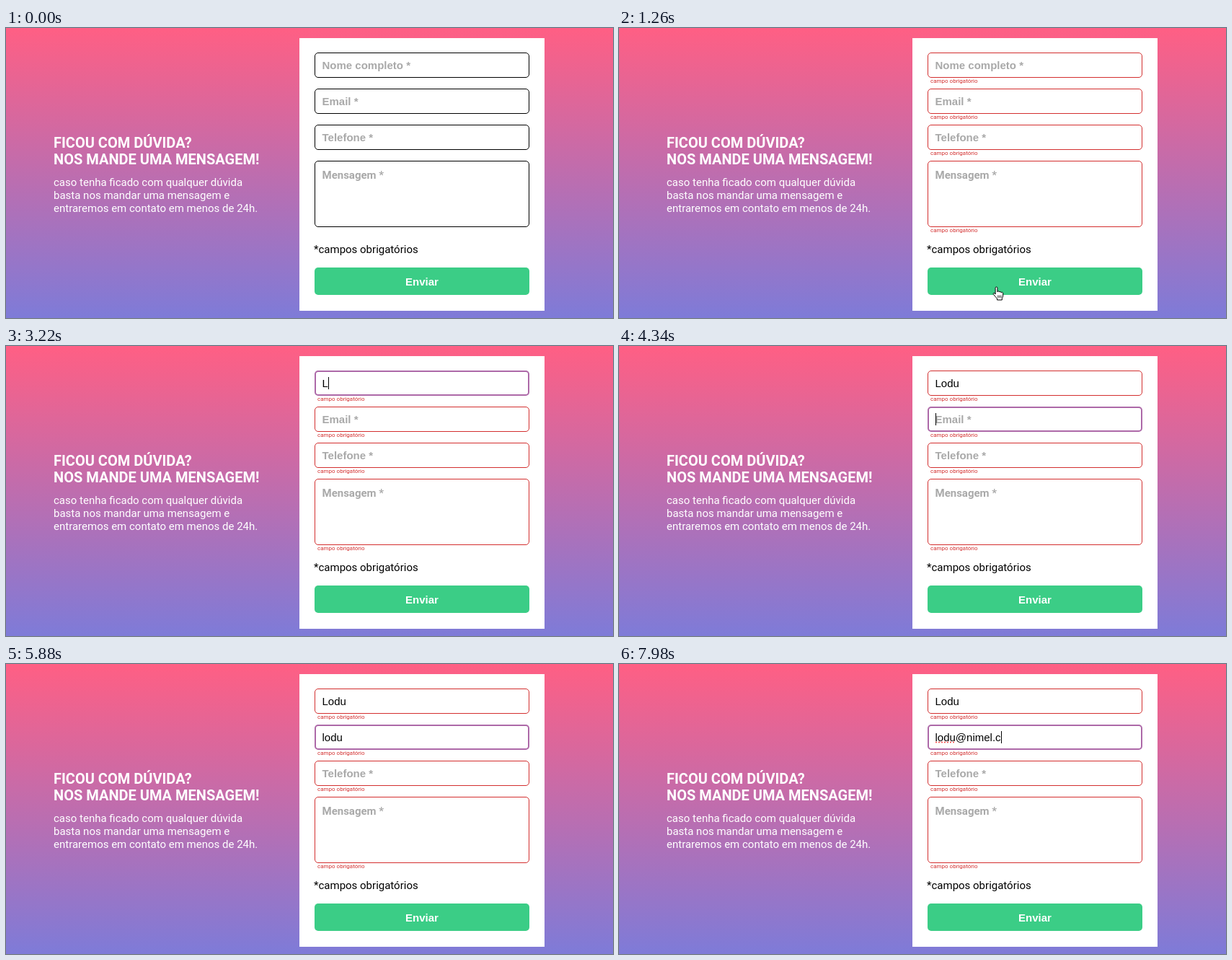
An HTML page that plays this animation: 842 by 402 pixels, repeating every 8000 ms.

```html
<!DOCTYPE html>
<html lang="pt">
<head>
<meta charset="utf-8">
<title>Formulário de contato</title>
<style>
  html, body { margin: 0; height: 100%; overflow: hidden; }
  svg { display: block; width: 100%; height: 100%; }
  text { font: 15px Roboto, sans-serif; white-space: pre; }
  .title { font-size: 20px; font-weight: 700; }
  .light { fill: #fff; }
  .error { font-size: 8px; fill: #d32f2f; }
  .input { font-family: "Liberation Sans", Arial, sans-serif; }
  .hint { font-weight: 700; fill: #a9a9a9; }
  .button { font-weight: 700; fill: #fff; text-anchor: middle; }
</style>
</head>
<body>
<svg id="stage" viewBox="0 0 842 402">
  <defs>
    <linearGradient id="sky" x2="0" y2="1">
      <stop stop-color="#ff5f84"/>
      <stop offset="1" stop-color="#7e7bd8"/>
    </linearGradient>
  </defs>
  <rect width="842" height="402" fill="url(#sky)"/>
  <g class="light">
    <text class="title" x="66" y="166">FICOU COM DÚVIDA?</text>
    <text class="title" x="66" y="189">NOS MANDE UMA MENSAGEM!</text>
    <text x="66" y="219">caso tenha ficado com qualquer dúvida</text>
    <text x="66" y="237">basta nos mandar uma mensagem e</text>
    <text x="66" y="255">entraremos em contato em menos de 24h.</text>
  </g>
  <rect x="407" y="14" width="340" height="378" fill="#fff"/>
  <g id="fields"></g>
  <text x="427" y="312">*campos obrigatórios</text>
  <rect x="428" y="332" width="298" height="38" rx="5" fill="#3bcd86"/>
  <text class="input button" x="577" y="357">Enviar</text>
  <path id="squiggle" d="M440 108.5H467" stroke="#f0403c" stroke-width="2"
        stroke-linecap="round" stroke-dasharray="0 4"/>
  <rect id="caret" width="1" height="17"/>
  <g id="cursor">
    <path id="arrow" d="M0 0V14L3.2 11 5.3 15.8 7.7 14.8 5.7 10H10.2Z" stroke="#fff"/>
    <g id="hand" transform="translate(-5.5 -.5)" fill="#fff" stroke="#000">
      <path d="M3.6 10.5V1.8Q3.6 .5 5 .5T6.4 1.8V7.2Q6.6 6.2 7.8 6.3T9 7.6Q9.4 6.8 10.4 7T11.6 8.3Q12 7.6 13 7.8T14.2 9.2V12.5Q14 14.5 12.8 16.2V18.5H6V16.6Q4 14.5 1 10.8 .2 9.6 1.2 9T3.6 10.5Z"/>
      <path d="M7.3 12V15.5M9.4 12V15.5M11.5 12V15.5" stroke-width=".8"/>
    </g>
    <path id="beam" d="M-3 -7.5Q0 -7.5 0 -5.5 0 -7.5 3 -7.5M0 -5.5V5.5M-3 7.5Q0 7.5 0 5.5 0 7.5 3 7.5M-1.5 1.5H1.5"
          fill="none" stroke="#000"/>
  </g>
</svg>
<script>
const LOOP = 8000, STEP = 70, TEXT_X = 439, BLINK = 490;
const ERRORS_AT = 1120, HIDE_CURSOR_AT = 3220, SQUIGGLE_AT = 6720;
const el = id => document.getElementById(id);
const show = (node, on) => node.setAttribute('visibility', on ? 'inherit' : 'hidden');

function add(tag, attrs, content = '') {
  const node = document.createElementNS('http://www.w3.org/2000/svg', tag);
  for (const key in attrs) node.setAttribute(key, attrs[key]);
  node.textContent = content;
  return el('fields').appendChild(node);
}

// keys: the moment each character of the value is typed
const fields = [
  { hint: 'Nome completo *', y: 34, focus: 2380, blur: 4060,
    value: 'Lodu', keys: [3220, 3430, 3570, 3710] },
  { hint: 'Email *', y: 84, focus: 4060, blur: LOOP, value: 'lodu@nimel.c',
    keys: [4830, 4970, 5180, 5390, 6720, 7070, 7140, 7280, 7350, 7560, 7770, 7980] },
  { hint: 'Telefone *', y: 134 },
  { hint: 'Mensagem *', y: 184, height: 92 },
];

for (const f of fields) {
  f.height ??= 35;
  f.value ??= '';
  f.keys ??= [];
  f.box = add('rect', { fill: '#fff' });
  const base = f.y + (f.height > 35 ? 25 : 23);
  f.hintText = add('text', {
    class: f.height > 35 ? 'hint' : 'input hint', x: TEXT_X - .5, y: base }, f.hint);
  f.text = add('text', { class: 'input', x: TEXT_X - .5, y: base });
  f.error = add('text', { class: 'error', x: 432, y: f.y + f.height + 7 }, 'campo obrigatório');
}

function drawField(f, t) {
  const focused = t >= f.focus && t < f.blur;
  const failed = t >= ERRORS_AT;
  const line = focused ? 2 : 1;
  const attrs = {
    x: 428 + line / 2, y: f.y + line / 2, width: 298 - line, height: f.height - line,
    rx: 5 - line / 2, 'stroke-width': line,
    stroke: focused ? '#ad69a8' : failed ? '#d32f2f' : '#000',
  };
  for (const key in attrs) f.box.setAttribute(key, attrs[key]);

  const typed = f.keys.filter(k => k <= t);
  f.text.textContent = f.value.slice(0, typed.length);
  show(f.hintText, !typed.length);
  show(f.error, failed);
  if (!focused) return;

  const width = typed.length ? f.text.getComputedTextLength() : 0;
  const idle = t - (typed.at(-1) ?? f.focus);
  el('caret').setAttribute('x', Math.floor(TEXT_X + width + .05));
  el('caret').setAttribute('y', f.y + 9);
  show(el('caret'), Math.floor(idle / (BLINK + 10 * (idle > BLINK))) % 2 === 0);
}

function glide(t, start, end, from, to) {
  const p = Math.min(1, Math.max(0, (t - start) / (end - start)));
  const e = p < .5 ? 2 * p * p : 1 - 2 * (1 - p) ** 2;
  return from.map((v, i) => v + (to[i] - v) * e);
}

function drawCursor(t) {
  const rest = [524, 359];
  const [x, y] = t < 1540
    ? glide(t, 0, 560, [745, 404], rest)
    : glide(t, 1540, 2100, rest, [506, 61]);
  const inColumn = x > 428 && x < 726;
  const onButton = inColumn && y > 332 && y < 370;
  const onField = inColumn && fields.some(f => y > f.y && y < f.y + f.height);
  el('cursor').setAttribute('transform', `translate(${x} ${y})`);
  show(el('cursor'), t > 0 && t < HIDE_CURSOR_AT);
  show(el('hand'), onButton);
  show(el('beam'), onField);
  show(el('arrow'), !onButton && !onField);
}

function draw(now) {
  const t = Math.floor(now % LOOP / STEP) * STEP;
  show(el('caret'), false);
  fields.forEach(f => drawField(f, t));
  drawCursor(t);
  show(el('squiggle'), t >= SQUIGGLE_AT);
}

const started = performance.now();
function tick() {
  draw(performance.now() - started);
  requestAnimationFrame(tick);
}
tick();
</script>
</body>
</html>
```
